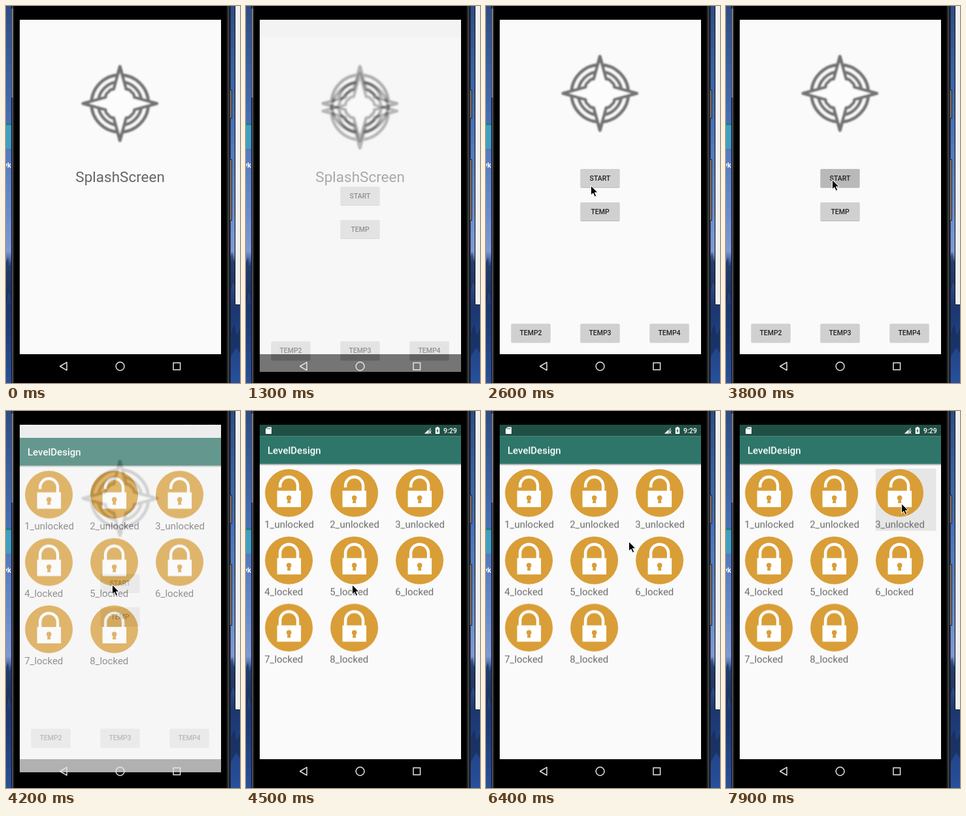
These frames come from a looping animation (358 by 576 pixels, 8 s). An HTML page:

```html
<!DOCTYPE html>
<html lang="en">
<head>
<meta charset="utf-8">
<title>Splash screen demo</title>
<style>
html, body { margin: 0; width: 100%; height: 100%; overflow: hidden; background: #000; }
svg { display: block; width: 358px; height: 576px; font-family: Roboto, "Noto Sans", sans-serif; }
.title { font-size: 22.5px; fill: #666; text-anchor: middle; }
.btn text { font-size: 10.5px; font-weight: 500; fill: #222; text-anchor: middle; }
.label { font-size: 15px; fill: #6b6b6b; }
.bar { font-size: 15px; font-weight: 500; fill: #fff; }
.clock { font-size: 10.5px; font-weight: 500; fill: #fff; }

/* 1.25% of the loop is one 100 ms tick */
.a { animation: 8s -10ms infinite step-end; }
#splash { animation-name: splash; }
#menu { animation-name: menu; }
#level { animation-name: level; }
#page { animation-name: page; }
#status { animation-name: status; }
#statusBg { animation-name: statusBg; }
#ripple { animation-name: ripple; }
#pressed { animation-name: pressed; }
#cursorShow { animation-name: show; }
#cursor { animation-name: move; }

@keyframes splash {
  0% { opacity: 1; }
  16.25% { opacity: .975; }
  18.75%, 100% { opacity: 0; }
}
@keyframes menu {
  0% { opacity: 0; transform: translateY(41px); }
  16.25% { opacity: .47; transform: translateY(27px); }
  17.5% { opacity: .85; transform: translateY(9px); }
  18.75% { opacity: 1; transform: none; }
  51.25% { opacity: .98; transform: none; }
  52.5% { opacity: .95; transform: none; }
  55%, 100% { opacity: 0; transform: none; }
}
@keyframes level {
  0% { opacity: 0; transform: translateY(41px); }
  51.25% { opacity: .34; transform: translateY(31px); }
  52.5% { opacity: .71; transform: translateY(20px); }
  53.75% { opacity: .92; transform: translateY(7px); }
  55%, 100% { opacity: 1; transform: none; }
}
@keyframes page {
  0% { transform: translateY(-17.5px); }
  55%, 100% { transform: none; }
}
@keyframes status {
  0% { opacity: 0; transform: translateY(-18px); }
  52.5% { opacity: 1; transform: translateY(-12px); }
  53.75% { opacity: 1; transform: translateY(-5px); }
  55%, 100% { opacity: 1; transform: none; }
}
@keyframes statusBg {
  0% { opacity: 0; }
  55%, 100% { opacity: 1; }
}
@keyframes ripple {
  0% { opacity: 0; }
  42.5% { opacity: .07; }
  43.75% { opacity: .15; }
  47.5% { opacity: .11; }
  48.75% { opacity: .07; }
  50% { opacity: .03; }
  51.25%, 100% { opacity: 0; }
}
@keyframes pressed {
  0% { opacity: 0; }
  96.25% { opacity: .4; }
  97.5% { opacity: .75; }
  98.75%, 100% { opacity: 1; }
}
@keyframes show {
  0% { opacity: 0; }
  23.75%, 100% { opacity: 1; }
}
@keyframes move {
  0% { transform: translate(346px, 440px); }
  23.75% { transform: translate(346px, 440px); animation-timing-function: steps(4); }
  28.75% { transform: translate(224px, 300px); animation-timing-function: steps(3); }
  32.5% { transform: translate(160px, 274px); }
  36.25% { transform: translate(160px, 274px); animation-timing-function: steps(3); }
  40% { transform: translate(162px, 265px); }
  58.75% { transform: translate(162px, 265px); animation-timing-function: steps(8); }
  68.75% { transform: translate(192px, 282px); }
  70% { transform: translate(192px, 282px); animation-timing-function: steps(8); }
  80% { transform: translate(218px, 199px); }
  81.25% { transform: translate(222px, 190px); }
  82.5% { transform: translate(184px, 310px); }
  83.75% { transform: translate(184px, 310px); animation-timing-function: steps(9); }
  95%, 100% { transform: translate(268px, 141px); }
}
</style>
</head>
<body>
<svg viewBox="0 0 358 576">
  <defs>
    <linearGradient id="sky" x2="0" y2="1">
      <stop offset="0" stop-color="#2c4c86"/>
      <stop offset=".3" stop-color="#456fba"/>
      <stop offset=".55" stop-color="#6a8dd2"/>
      <stop offset=".65" stop-color="#7f9ad6"/>
      <stop offset=".68" stop-color="#3a5998"/>
      <stop offset=".8" stop-color="#1c3670"/>
      <stop offset="1" stop-color="#28509c"/>
    </linearGradient>
    <linearGradient id="shade" x2="0" y2="1">
      <stop offset="0" stop-opacity=".3"/>
      <stop offset="1" stop-opacity="0"/>
    </linearGradient>
    <filter id="soft" x="-10%" y="-10%" width="120%" height="120%"><feGaussianBlur stdDeviation="1.15"/></filter>
    <filter id="drop" x="-10%" y="-20%" width="120%" height="150%">
      <feDropShadow dx="0" dy=".8" stdDeviation=".6" flood-opacity=".3"/>
    </filter>
    <clipPath id="screen"><rect x="21" y="21" width="308" height="547"/></clipPath>

    <g id="compass" filter="url(#soft)" fill="none" stroke="#737373">
      <circle r="43.5" stroke-width="5" fill="#fafafa"/>
      <circle r="33.5" stroke-width="5"/>
      <path d="M0-56.5 9.5-22Q15-22 17.5-17.5 22-15 22-9.5L56.5 0 22 9.5Q22 15 17.5 17.5 15 22 9.5 22L0 56.5-9.5 22Q-15 22-17.5 17.5-22 15-22 9.5L-56.5 0-22-9.5Q-22-15-17.5-17.5-15-22-9.5-22Z" stroke-width="4.8" stroke-linejoin="round" fill="#fcfcfc"/>
    </g>
    <rect id="key" x="-30" y="-14" width="60" height="28" rx="1.5"/>
    <g id="body">
      <circle r="36.5" fill="#d99e37"/>
      <rect x="-18" y="-3.5" width="36.5" height="25" fill="#fff"/>
      <path d="M-1.4 7 -2.6 15.5H2.8L1.6 7Z" fill="#d99e37"/>
      <circle cx=".1" cy="7.5" r="3.8" fill="#d99e37"/>
    </g>
    <g id="open">
      <use href="#body"/>
      <path d="M-13.5-8.5V-11a13.5 13.5 0 0 1 27 0V-3" fill="none" stroke="#fff" stroke-width="4.5"/>
    </g>
    <g id="shut">
      <use href="#body"/>
      <path d="M-13.5-3V-11a13.5 13.5 0 0 1 27 0V-3" fill="none" stroke="#fff" stroke-width="4.5"/>
    </g>
  </defs>

  <!-- desktop -->
  <rect width="358" height="576" fill="url(#sky)"/>
  <path d="M0 392 3 384 5 398 8 390V450L4 436 0 458ZM343 384l3-8 3 14 2-4V430l-4-8-4 14ZM344 500l5-14 4 18 5-12V530l-6-8-8 14Z" fill="#122549" opacity=".5"/>
  <rect y="179" width="8" height="39" fill="#3f9fc4"/>
  <rect y="179" width="8" height="3" fill="#257c83"/>
  <text x="-3.5" y="247" font-size="11" font-weight="700" fill="#fff">yk</text>
  <path d="M350 0H358V457H350Z" fill="#111"/>
  <path d="M351 0H358V456H351Z" fill="#f0f0f0"/>

  <!-- phone -->
  <rect x="8" width="335.5" height="576" fill="#131416"/>
  <rect x="9" width="2" height="576" fill="#4a4c52"/>
  <rect x="8.5" y="4" width="2.5" height="136" fill="#7a7c82"/>
  <rect x="339" width="2.5" height="576" fill="#3c3e43"/>
  <g fill="#7f776c" stroke="#28282a">
    <rect x="342.5" y="128.5" width="3" height="43"/>
    <rect x="342.5" y="234.5" width="3" height="93"/>
  </g>
  <rect x="13" width="324" height="576"/>

  <g clip-path="url(#screen)">
    <g id="splash" class="a">
      <rect x="21" y="21" width="308" height="511" fill="#fafafa"/>
      <use href="#compass" x="174.3" y="149"/>
      <text class="title" x="174.6" y="269">SplashScreen</text>
    </g>

    <g id="menu" class="a">
      <rect x="21" y="21" width="308" height="511" fill="#fafafa"/>
      <use href="#compass" x="174.3" y="133.5"/>
      <g fill="#d0d0d0" filter="url(#drop)">
        <use href="#key" x="174.5" y="263"/>
        <use href="#key" x="174.5" y="314"/>
        <use href="#key" x="68.5" y="499.5"/>
        <use href="#key" x="174.5" y="499.5"/>
        <use href="#key" x="280.5" y="499.5"/>
      </g>
      <use id="ripple" class="a" href="#key" x="174.5" y="263"/>
      <g class="btn">
        <text x="174.5" y="267">START</text>
        <text x="174.5" y="318">TEMP</text>
        <text x="68.5" y="503">TEMP2</text>
        <text x="174.5" y="503">TEMP3</text>
        <text x="280.5" y="503">TEMP4</text>
      </g>
    </g>

    <g id="level" class="a">
      <rect x="21" y="21" width="308" height="511" fill="#fafafa"/>
      <g id="page" class="a">
        <rect x="21" y="38.5" width="308" height="42.5" fill="#2d7669"/>
        <rect x="21" y="81" width="308" height="3" fill="url(#shade)"/>
        <text class="bar" x="33" y="65.6">LevelDesign</text>
        <rect id="pressed" class="a" x="229" y="88" width="92.5" height="95" fill="#e6e6e6"/>
        <use href="#open" x="65.6" y="125.3"/>
        <use href="#open" x="165.6" y="125.3"/>
        <use href="#open" x="265.6" y="125.3"/>
        <use href="#shut" x="65.6" y="228.2"/>
        <use href="#shut" x="165.6" y="228.2"/>
        <use href="#shut" x="265.6" y="228.2"/>
        <use href="#shut" x="65.6" y="331"/>
        <use href="#shut" x="165.6" y="331"/>
        <g class="label">
          <text x="28.2" y="178.9">1_unlocked</text>
          <text x="128.2" y="178.9">2_unlocked</text>
          <text x="228.2" y="178.9">3_unlocked</text>
          <text x="28.2" y="281.7">4_locked</text>
          <text x="128.2" y="281.7">5_locked</text>
          <text x="228.2" y="281.7">6_locked</text>
          <text x="28.2" y="384.5">7_locked</text>
          <text x="128.2" y="384.5">8_locked</text>
        </g>
      </g>
    </g>

    <g id="status" class="a">
      <rect id="statusBg" class="a" x="21" y="21" width="308" height="17.5" fill="#204f46"/>
      <path d="M33 24.5H39V35H30V27.5Z" fill="#fff"/>
      <path d="M32.8 26v2M34.8 26v2M36.8 26v2" stroke="#204f46" stroke-width=".9"/>
      <path d="M283 25V34.5H273Z" fill="#fff" opacity=".45"/>
      <path d="M279 28.8V34.5H273Z" fill="#fff"/>
      <path d="M279.5 30.5l4 4m0-4-4 4" stroke="#fff"/>
      <path d="M289.8 25.5H291.6V24.3H294.4V25.5H296.2V35H289.8Z" fill="#fff"/>
      <path d="M293.5 26.5 291.3 30.6H292.7V34L294.8 29.7H293.5Z" fill="#204f46"/>
      <text class="clock" x="302" y="33.6">9:29</text>
    </g>
  </g>

  <g fill="none" stroke="#e4e4e4" stroke-width="1.5">
    <path d="M93 544.4V556.6L82.6 550.5Z" stroke-linejoin="round"/>
    <circle cx="174.6" cy="550.5" r="6.4"/>
    <rect x="256" y="545.2" width="10.6" height="10.6"/>
  </g>

  <g id="cursorShow" class="a">
    <path id="cursor" class="a" d="M.5 .5V15L3.8 12 6.3 17.4 8.8 16.3 6.4 11H11Z" stroke="#fff" stroke-width="1" stroke-linejoin="round"/>
  </g>
</svg>
</body>
</html>
```
